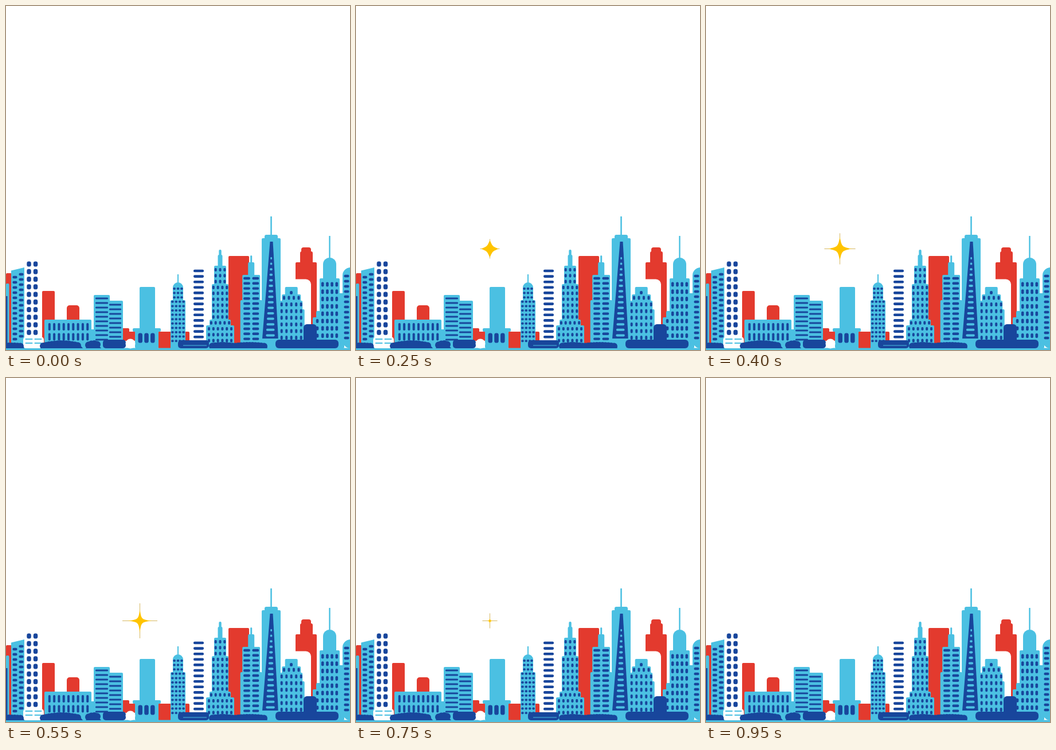
Recreate the animation shown at these times as an HTML page with a canvas. Size 600 by 600 pixels, loop 3000 ms.

```html
<!DOCTYPE html>
<html lang="en">
<head>
<meta charset="utf-8">
<title>Skyline</title>
<style>
html, body { margin: 0; width: 100%; height: 100%; overflow: hidden; background: #fff; }
canvas { display: block; width: 600px; height: 600px; }
</style>
</head>
<body>
<canvas id="stage" width="600" height="600"></canvas>
<script>
const SIZE = 600, GROUND = 597, LOOP = 3000, STEP = 50;
const RED = '#e33a2e', SKY = '#4bc0e2', NAVY = '#18469c', WHITE = '#fff', GOLD = '#ffc400', RAY = '#d6b864';

const ctx = document.getElementById('stage').getContext('2d');
const city = document.createElement('canvas');
city.width = city.height = SIZE;
const g = city.getContext('2d');

// Rounded box from its edges.
function box(color, x1, x2, top, bottom = GROUND, r = 2) {
  g.fillStyle = color;
  g.beginPath();
  g.roundRect(x1, top, x2 - x1, bottom - top, r);
  g.fill();
}

function poly(color, ...p) {
  g.fillStyle = color;
  g.beginPath();
  for (let i = 0; i < p.length; i += 2) g.lineTo(p[i], p[i + 1]);
  g.fill();
}

function disc(color, x, y, r) {
  g.fillStyle = color;
  g.beginPath();
  g.arc(x, y, r, 0, Math.PI * 2);
  g.fill();
}

// A centred row of n windows.
function row(cx, y, n, gap, w, h, color = NAVY) {
  for (let i = 0; i < n; i++) {
    const x = cx + (i - (n - 1) / 2) * gap;
    box(color, x - w / 2, x + w / 2, y - h / 2, y + h / 2, Math.min(w, h) * 0.45);
  }
}

function grid(cx, y, last, step, n, gap, w, h) {
  for (; y <= last; y += step) row(cx, y, n, gap, w, h);
}

// Stacked tiers [half width, top, corner], each wider than the one above.
function tower(cx, tiers) {
  for (const [half, top, r = 2] of tiers) {
    box(SKY, cx - half, cx + half, top, GROUND, [r, r, 0, 0]);
  }
}

// Fits as many windows in each row as the tier there allows.
function glaze(cx, tiers, y, step, gap, w, h) {
  for (; y < 586; y += step) {
    const [half] = tiers.findLast(tier => tier[1] < y - h / 2);
    row(cx, y, Math.round(2 * half / gap), gap, w, h);
  }
}

// Bushes: overlapping bumps, tallest in the middle.
function bushes(x1, x2, height) {
  g.save();
  g.beginPath();
  g.rect(0, 0, SIZE, GROUND);
  g.clip();
  for (let x = x1 + 5; x <= x2 - 5; x += 5) {
    const rise = Math.sin(Math.PI * (x - x1) / (x2 - x1));
    disc(NAVY, x, GROUND - 3 - rise * (height - 9), 6);
  }
  poly(NAVY, x1, GROUND, x1 + 5, GROUND - 6, x2 - 5, GROUND - 6, x2, GROUND);
  g.restore();
}

function backRow() {
  box(RED, 0, 10, 466);
  box(RED, 63, 85, 497);
  box(RED, 106, 128, 522, 560, 5);
  box(RED, 200, 215, 562, 584);
  box(RED, 212, 226, 568, 584);
  box(RED, 265, 320, 568);
  box(RED, 388, 424, 436, 594);
  box(RED, 515, 532, 421, 434, 4);
  box(RED, 513, 535, 428, 452, 3);
  box(RED, 505, 542, 447, 560);
  box(WHITE, 504, 532, 476.5, 560, [0, 9, 0, 0]);
}

function westSide() {
  box(SKY, 0, 5.5, 484);
  box(NAVY, 0, 2.5, 506, 590, 0);
  poly(SKY, 9, 461.5, 32, 456, 32, GROUND, 9, GROUND);
  grid(15.5, 473, 585, 9, 1, 0, 8, 4.5);
  grid(26.5, 468, 580, 9, 1, 0, 8, 4.5);
  grid(45.8, 450, 570, 13.25, 2, 11.5, 7.5, 9);

  box(SKY, 67, 149, 547);
  box(SKY, 145, 164, 564);
  grid(109, 559.5, 577, 17.5, 9, 8.3, 4, 13);

  box(SKY, 153, 181, 504);
  box(SKY, 179, 204, 514);
  grid(167, 510, 582, 8, 1, 0, 22, 3);
  grid(190.5, 521, 577, 8, 1, 0, 21, 3);
}

function monument() {
  box(SKY, 233, 260, 490);
  box(SKY, 221, 270, 562, 568);
  box(SKY, 225, 266, 566);
  row(245, 579, 3, 10.8, 7.5, 17);
}

function midTown() {
  const slim = [[1, 468, 0], [9, 482, 9], [13, 513]];
  tower(300, slim);
  glaze(300, slim, 493, 7.6, 6.4, 4.5, 4);

  grid(336, 462, 578, 9.6, 1, 0, 18, 4.6);

  const stepped = [[2.2, 425], [4, 434], [10.5, 453], [14.5, 485], [18.5, 547], [24.5, 557]];
  tower(373.5, stepped);
  glaze(373.5, stepped, 460, 10.3, 7.8, 4, 6.2);

  const office = [[1.5, 435], [5.5, 447], [15.5, 469], [19, 513]];
  tower(427.7, office);
  glaze(427.7, office, 475, 8.8, 15.4, 11.8, 4.4);
}

function tallTower() {
  tower(462.5, [[1.3, 367, 0], [11.5, 399, 3], [16.5, 405]]);
  poly(NAVY, 460.5, 411, 465.5, 411, 475, 580, 447, 580);
  for (let y = 440; y < 575; y += 9.6) {
    const down = (y - 411) / 169;
    row(463 - down * 2, y, 1, 0, 16 * down, 4, SKY);
  }
}

function eastSide() {
  const ziggurat = [[11, 490], [16.5, 503], [19.5, 514], [23, 529]];
  tower(497.7, ziggurat);
  row(497.5, 500, 1, 0, 5, 6);
  glaze(497.7, ziggurat, 509, 11.6, 8.5, 4, 7);

  const domed = [[1.2, 401, 0], [11.5, 439, 11.5], [17.5, 475]];
  tower(564.5, domed);
  box(SKY, 541, 550, 532);
  box(SKY, 535, 550, 543);
  box(SKY, 579, 590, 501);
  glaze(564.5, domed, 485.5, 12.8, 8.2, 4.6, 8);
  grid(543, 549.5, 576, 12.8, 1, 0, 4.6, 7);

  box(SKY, 587, 615, 456, GROUND, 14);
  grid(594, 471, 582, 9, 1, 0, 9, 4.5);
}

function ground() {
  box(SKY, 0, SIZE, GROUND - 0.5, SIZE, 0);
  box(WHITE, 30, 66, 577, GROUND, 5);
  for (const y of [581, 588]) row(48, y, 2, 16, 13, 2, SKY);
  bushes(-10, 32, 10);
  bushes(60, 134, 14);
  bushes(139, 166, 14);
  box(NAVY, 169, 209, 582, GROUND, 5);
  disc(WHITE, 217, 589, 8.5);
  box(NAVY, 300, 354, 583, GROUND, 5);
  box(SKY, 309, 350, 591.5, 592.5, 0);
  bushes(355, 400, 11);
  bushes(395, 456, 11);
  box(NAVY, 470, 580, 582, GROUND, 6);
  box(NAVY, 519, 542, 555, GROUND, 6);
}

for (const part of [backRow, westSide, monument, midTown, tallTower, eastSide, ground]) part();

const progress = (t, from, to) => Math.min(1, Math.max(0, (t - from) / (to - from)));
const easeOut = u => 1 - (1 - u) ** 2;
const smooth = u => u * u * (3 - 2 * u);

// The arms swell and shrink; the thin rays peak later and linger.
function star(t) {
  const arm = 20.5 * easeOut(progress(t, 100, 400)) * (1 - progress(t, 550, 800));
  const ray = 30.5 * easeOut(progress(t, 100, 550)) * (1 - smooth(progress(t, 550, 915)));
  const waist = Math.min(arm * 0.42, 4.5 - (t - 250) / 150);

  ctx.save();
  ctx.translate(233.5, 423.5);
  ctx.fillStyle = RAY;
  ctx.fillRect(-ray, -0.5, ray * 2, 1);
  ctx.fillRect(-0.5, -ray, 1, ray * 2);
  ctx.fillStyle = GOLD;
  for (let i = 0; i < 4; i++) {
    ctx.beginPath();
    ctx.moveTo(0, 0);
    ctx.lineTo(-0.5, 0);
    ctx.lineTo(0, -arm);
    ctx.bezierCurveTo(waist, -waist, waist, -waist, arm, 0);
    ctx.lineTo(0, 0.5);
    ctx.fill();
    ctx.rotate(Math.PI / 2);
  }
  ctx.restore();
}

const start = performance.now();

function frame() {
  const elapsed = Math.max(0, performance.now() - start) % LOOP;
  const t = Math.floor(elapsed / STEP) * STEP;
  ctx.fillStyle = WHITE;
  ctx.fillRect(0, 0, SIZE, SIZE);
  ctx.drawImage(city, 0, 0);
  if (t >= 150 && t < 950) star(t);
  requestAnimationFrame(frame);
}
frame();
</script>
</body>
</html>
```
